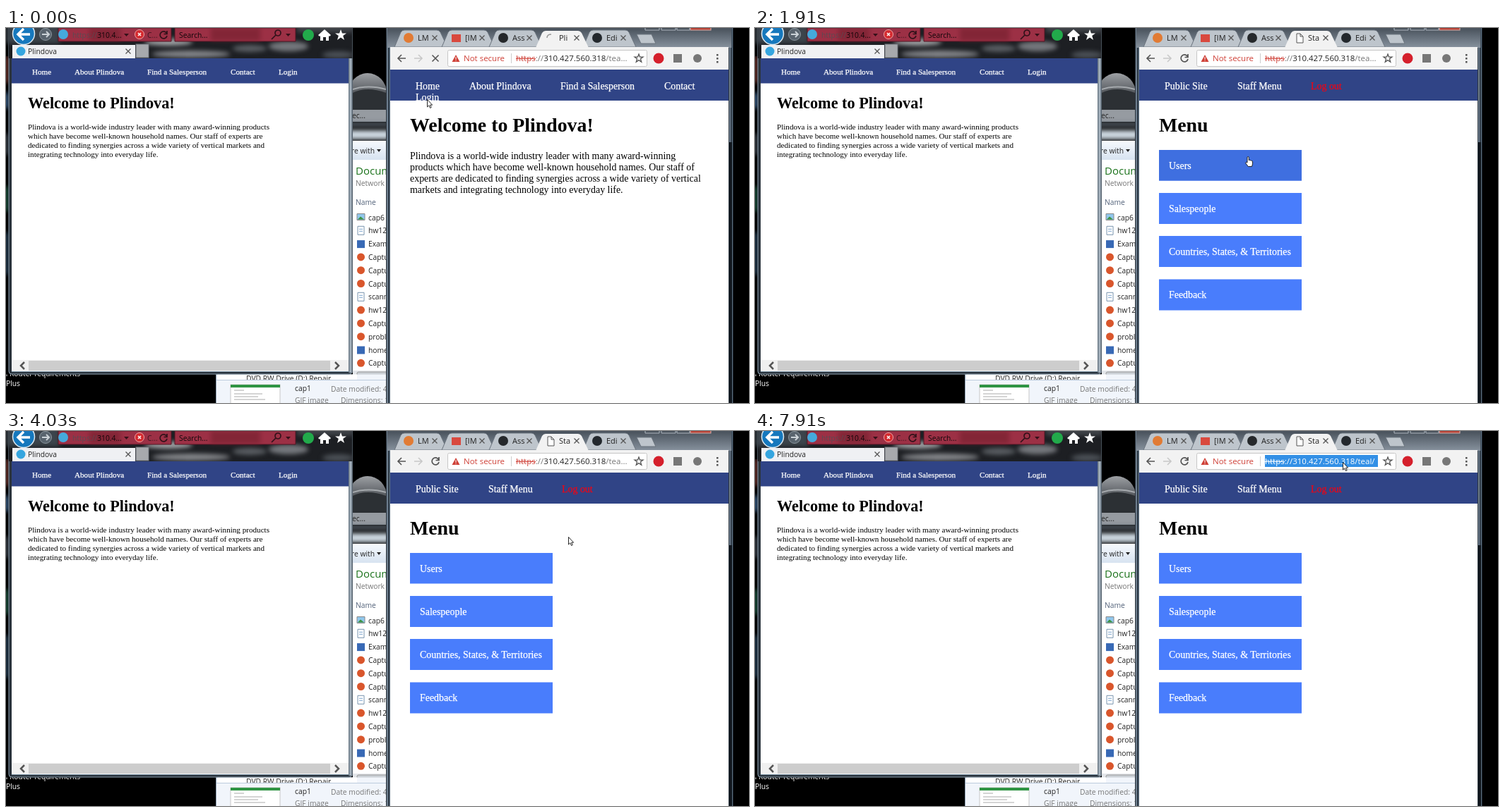
An HTML page that plays this animation: 1052 by 532 pixels, repeating every 8000 ms.

```html
<!DOCTYPE html>
<html lang="en">
<head>
<meta charset="utf-8">
<title>Two browsers</title>
<style>
html, body { margin: 0; width: 100%; height: 100%; overflow: hidden; background: #000; }
svg { display: block; }
text { white-space: pre; }
.ui { font: 10.3px "Open Sans", "Noto Sans", sans-serif; fill: #222; }
.tab { font-size: 11px; }
.url { font-size: 11.5px; }
.site { font: 13.92px "Liberation Serif", serif; }
.small { font-size: 11.14px; }
.h1 { font-size: 2em; font-weight: bold; }
.white { fill: #fff; }
.site .white { stroke: #fff; stroke-width: .25; }
.site .logout { fill: #f00414; stroke: #f00414; }
.red { fill: #cf4037; }
.grey { fill: #777; }
.line { fill: none; stroke: #555; stroke-width: 1.6; }
.soft { filter: blur(3px); }

/* Every layer shares one 8 s clock and changes in hard steps. */
.home, .loading, .users, .sales, .selected, .pointer, .arrow, .hand, .beam {
  animation: 8s step-end infinite;
}
.home { animation-name: home; }
.loading { animation-name: loading; }
.users { animation-name: users; }
.sales { animation-name: sales; }
.selected { animation-name: selected; }
.pointer { animation-name: pointer; }
.arrow { animation-name: arrow; }
.hand { animation-name: hand; }
.beam { animation-name: beam; }

@keyframes home { 0% { opacity: 1 } 1.75%, 100% { opacity: 0 } }
@keyframes loading { 0% { opacity: 1 } 3.375%, 100% { opacity: 0 } }
@keyframes users { 0%, 38.375%, 100% { opacity: 0 } 13.5% { opacity: 1 } }
@keyframes sales { 0%, 46.625%, 100% { opacity: 0 } 41.625% { opacity: 1 } }
@keyframes selected { 0% { opacity: 0 } 69%, 100% { opacity: 1 } }
@keyframes arrow {
  0%, 38.375%, 46.625%, 70.875%, 100% { opacity: 1 }
  13.5%, 41.625%, 60.125% { opacity: 0 }
}
@keyframes hand { 0%, 38.375%, 46.625%, 100% { opacity: 0 } 13.5%, 41.625% { opacity: 1 } }
@keyframes beam { 0%, 70.875%, 100% { opacity: 0 } 60.125% { opacity: 1 } }
@keyframes pointer {
  0% { transform: translate(596px, 101px) }
  9.875% { transform: translate(610px, 117px) }
  11.625% { transform: translate(638px, 148px) }
  13.5% { transform: translate(669px, 177px) }
  15.25% { transform: translate(687px, 182px) }
  18.75% { transform: translate(689px, 182px) }
  20.5% { transform: translate(691px, 182px) }
  22.125% { transform: translate(692px, 182px) }
  23.875% { transform: translate(694px, 182px) }
  27.75% { transform: translate(695px, 185px) }
  29.5% { transform: translate(697px, 189px) }
  31.25% { transform: translate(699px, 194px) }
  33% { transform: translate(702px, 200px) }
  34.75% { transform: translate(705px, 207px) }
  36.625% { transform: translate(708px, 214px) }
  38.375% { transform: translate(713px, 226px) }
  40.125% { transform: translate(717px, 238px) }
  41.625% { transform: translate(714px, 236px) }
  46.625% { transform: translate(738px, 222px) }
  48.375% { transform: translate(776px, 188px) }
  50% { transform: translate(796px, 150px) }
  51.75% { transform: translate(808px, 118px) }
  53.375% { transform: translate(814px, 95px) }
  54.875% { transform: translate(817px, 84px) }
  56.625% { transform: translate(818px, 72px) }
  58.375% { transform: translate(817px, 60px) }
  60.125% { transform: translate(814px, 41px) }
  61.875% { transform: translate(812px, 35px) }
  63.75% { transform: translate(805px, 36px) }
  65.5% { transform: translate(799px, 37px) }
  67.375% { transform: translate(803px, 38px) }
  70.875% { transform: translate(807px, 45px) }
  76.375% { transform: translate(809px, 45px) }
  78% { transform: translate(811px, 45px) }
  79.75% { transform: translate(813px, 45px) }
  81.375% { transform: translate(815px, 45px) }
  83.125% { transform: translate(817px, 44px) }
  84.75% { transform: translate(819px, 44px) }
  86.5% { transform: translate(820px, 44px) }
  97.25% { transform: translate(826px, 44px) }
  98.875%, 100% { transform: translate(832px, 44px) }
}
</style>
</head>
<body>
<svg width="1052" height="532" viewBox="0 0 1052 532">
<defs>
  <linearGradient id="strip" x2="0" y2="1"><stop stop-color="#48515b"/><stop offset="1" stop-color="#87929e"/></linearGradient>
  <linearGradient id="bar" x2="0" y2="1"><stop stop-color="#f6f9fd"/><stop offset="1" stop-color="#d6e2f0"/></linearGradient>
  <linearGradient id="lid" x2="0" y2="1"><stop stop-color="#9da0a4"/><stop offset=".5" stop-color="#54585d"/><stop offset="1" stop-color="#1d2023"/></linearGradient>
  <linearGradient id="edge"><stop stop-color="#11161c"/><stop offset=".35" stop-color="#8fa3b6"/><stop offset=".6" stop-color="#1c2530"/><stop offset="1" stop-color="#6f8496"/></linearGradient>
  <linearGradient id="rim"><stop stop-color="#5d6b78"/><stop offset=".5" stop-color="#b3c0cb"/><stop offset="1" stop-color="#46525e"/></linearGradient>
  <clipPath id="list"><path d="M491 60h47v438h-47z"/></clipPath>
  <clipPath id="below"><path d="M0 491.500h538v41H0z"/></clipPath>
  <clipPath id="tree"><path d="M298 492h200v7H298z"/></clipPath>
  <clipPath id="glass"><path d="M0 0h491v43H0z"/></clipPath>
  <clipPath id="side"><path d="M0 40h9v450H0z"/></clipPath>
  <path id="x" d="M-3.500-3.500l7 7m0-7l-7 7" fill="none" stroke="#555" stroke-width="1.300"/>
  <path id="star" d="M0-8 2-2.600 8-2.500 3.200 1 5 7 0 3.500-5 7-3.200 1-8-2.500-2-2.600z"/>
  <path id="tabshape" d="M0 27 9 6Q11 3 14 3H60Q63 3 65 6L75 27z"/>
  <path id="reload" d="M4.500-2.500A5 5 0 1 0 5 1M5-6v4.500H.500" fill="none" stroke-width="1.700"/>
</defs>

<!-- Desktop and file window -->
<rect width="1052" height="532"/>
<g clip-path="url(#list)">
  <ellipse cx="512" cy="92" rx="27" ry="28" fill="url(#lid)"/>
  <path d="M491 92q20-10 47 0v26h-47z" fill="#2c3034"/>
  <path d="M491 87q22-7 47 0" fill="none" stroke="#a6aaae" stroke-width="2"/>
  <rect x="491" y="116" width="47" height="17" fill="#969ba1"/>
  <text class="ui" x="490" y="128">ec...</text>
  <g class="soft">
    <rect x="485" y="134" width="58" height="5" fill="#69747f"/>
    <rect x="485" y="145" width="58" height="13" fill="#cdd8e1"/>
  </g>
  <rect x="491" y="160" width="47" height="28" fill="url(#bar)"/>
  <text class="ui" x="489" y="178">re with</text>
  <path d="M525 172h6l-3 4z" fill="#222"/>
  <rect x="491" y="187" width="47" height="300" fill="#fff"/>
  <text class="ui" x="495" y="208" style="font-size:15px;fill:#1b721b">Documents</text>
  <text class="ui grey" x="495" y="224">Network</text>
  <text class="ui" x="495" y="251" style="fill:#53627a">Name</text>
  <g id="files" class="ui"></g>
  <rect x="491" y="486" width="47" height="13" fill="#e3e6ea"/>
  <rect x="497" y="488" width="50" height="9" rx="2" fill="#cbd0d6" stroke="#999"/>
</g>
<g class="ui" clip-path="url(#below)">
  <text class="white" x="-6" y="494">al Router requirements</text>
  <text class="white" x="0" y="508">Plus</text>
  <rect x="297" y="490" width="241" height="42" fill="#f1f5fb"/>
  <path d="M297.500 490v42" stroke="#8fa0b2"/>
  <rect x="299" y="490" width="198" height="9" fill="#fff"/>
  <text x="340" y="501" clip-path="url(#tree)">DVD RW Drive (D:) Repair</text>
  <path d="M298 499.500h240" stroke="#bccbdd"/>
  <rect x="318" y="506" width="70" height="30" fill="#fff" stroke="#c7c7c7"/>
  <rect x="318" y="506" width="70" height="4" fill="#2f9443"/>
  <path d="M323 514h14M323 519h40M323 523h34M323 527h44" stroke="#aaa"/>
  <text x="409" y="515">cap1</text>
  <text class="grey" x="409" y="532">GIF image</text>
  <text class="grey" x="460" y="516">Date modified: 4</text>
  <text class="grey" x="474" y="532">Dimensions: 1</text>
</g>

<!-- Left browser -->
<g clip-path="url(#side)">
  <g class="soft">
    <rect x="-4" y="40" width="9" height="38" fill="#5b2b25"/>
    <rect x="-4" y="92" width="8" height="22" fill="#35587f"/>
    <rect x="-4" y="150" width="8" height="30" fill="#353c45"/>
    <rect x="-4" y="225" width="8" height="35" fill="#194d39"/>
    <rect x="-4" y="290" width="8" height="60" fill="#22394e"/>
  </g>
</g>
<rect x="4" y="-5" width="486" height="496" rx="4" fill="#2a333c" stroke="#8fa3b4"/>
<g clip-path="url(#glass)">
  <rect x="4" width="486" height="43" fill="#1d1f23"/>
  <g class="soft">
    <rect x="0" y="-4" width="76" height="26" fill="#3c444c"/>
    <ellipse cx="230" cy="20" rx="34" ry="5" fill="#a2a4a7"/>
    <ellipse cx="262" cy="37" rx="55" ry="5" fill="#85878b"/>
    <ellipse cx="400" cy="26" rx="28" ry="7" fill="#74777c"/>
    <ellipse cx="345" cy="29" rx="24" ry="5" fill="#5a5e63"/>
    <rect x="412" y="-3" width="80" height="9" fill="#43474c"/>
    <ellipse cx="470" cy="38" rx="22" ry="5" fill="#4c5157"/>
  </g>
  <path d="M74 0h160v19H74zM239 0h171v19H239z" fill="#9c3045" stroke="#521724"/>
  <path d="M118 0h44v18h-44zM290 0h70v18h-70z" fill="#75202f" opacity=".65" class="soft"/>
</g>
<circle cx="25" cy="8" r="15.500" fill="#1678bd" stroke="#dce8f0" stroke-width="1.500"/>
<path d="M34 9H17m8-8-8 8 8 8" fill="none" stroke="#fff" stroke-width="3.500"/>
<circle cx="56" cy="9" r="8.500" fill="#59646e" stroke="#8a959d"/>
<path d="M51 9h10m-4-4 4 4-4 4" fill="none" stroke="#ccd3d8" stroke-width="2"/>
<circle cx="81" cy="9" r="7" fill="#45a9dc"/>
<g class="ui">
  <text x="94" y="14" style="fill:#5b4a52">https://<tspan fill="#120609">310.4...</tspan></text>
  <path d="M167 8h7l-3.500 4zM396 8h7l-3.500 4z" fill="#351019"/>
  <circle cx="189" cy="9" r="6.500" fill="#d42a2f" stroke="#efa7a7"/>
  <path d="M187 7l4 4m0-4-4 4" stroke="#fff" stroke-width="1.500"/>
  <text x="200" y="14" style="fill:#431722">C...</text>
  <use href="#reload" x="223" y="10" stroke="#32121a"/>
  <text x="245" y="14" style="fill:#12070a">Search...</text>
  <g fill="none" stroke="#32121a" stroke-width="1.700"><circle cx="385" cy="7" r="4"/><path d="M382 10l-6 6"/></g>
  <circle cx="428" cy="10" r="8" fill="#22aa4b"/>
  <path d="M442 10l9-8 9 8-2 2-1-1v7h-4v-5h-4v5h-4v-7l-1 1z" fill="#fff"/>
  <use href="#star" x="474" y="10" fill="#fff"/>
  <path d="M9 43V24h174v19z" fill="#eff0f3"/>
  <circle cx="21" cy="33" r="6.500" fill="#35a5df"/>
  <text x="31" y="37">Plindova</text>
  <use href="#x" x="173" y="33"/>
  <rect x="184" y="23" width="18" height="19" fill="#a7a9ad" stroke="#70757c"/>
</g>
<rect x="8" y="43" width="477" height="444" fill="#fff"/>
<rect x="8" y="43" width="477" height="35.500" fill="#304486"/>
<g class="site small">
  <g class="white">
    <text x="37" y="66">Home</text>
    <text x="97" y="66">About Plindova</text>
    <text x="200" y="66">Find a Salesperson</text>
    <text x="318" y="66">Contact</text>
    <text x="386" y="66">Login</text>
  </g>
  <text class="h1" x="31" y="113.500">Welcome to Plindova!</text>
  <text x="31" y="144">Plindova is a world-wide industry leader with many award-winning products</text>
  <text x="31" y="157">which have become well-known household names. Our staff of experts are</text>
  <text x="31" y="170">dedicated to finding synergies across a wide variety of vertical markets and</text>
  <text x="31" y="183">integrating technology into everyday life.</text>
</g>
<rect x="8" y="471" width="477" height="16" fill="#f0f0f0"/>
<rect x="32" y="472" width="427" height="14" fill="#cdcdcd"/>
<path d="M26 474l-5 5 5 5M466 474l5 5-5 5" fill="none" stroke="#555" stroke-width="2.500"/>
<rect x="485" y="43" width="6" height="446" fill="url(#rim)"/>
<path d="M8 487.500h477" stroke="#7b93a5"/>

<!-- Right browser -->
<rect x="538" width="492" height="532" fill="#1b222b"/>
<rect x="538" width="6" height="532" fill="url(#edge)"/>
<rect x="1023" width="6" height="532" fill="url(#edge)"/>
<rect x="1024" y="162" width="4" height="370" fill="#10161d"/>
<rect x="540" width="487" height="28" fill="url(#strip)"/>
<path d="M905-3h20v6h-20zM928-3h20v6h-20zM950-3h18v6h-18z" fill="#49525c" stroke="#b1bac3"/>
<rect x="969" y="-3" width="29" height="6" fill="#b44236" stroke="#ddb2ac"/>
<g fill="#bec5cc" stroke="#6b747e">
  <use href="#tabshape" x="817"/>
  <use href="#tabshape" x="550"/>
  <use href="#tabshape" x="617"/>
  <use href="#tabshape" x="684"/>
  <path d="M893 9h21l6 13h-21z"/>
</g>
<rect x="544" y="27" width="479" height="32" fill="#f2f2f2"/>
<use href="#tabshape" x="750" y="1" fill="#f2f2f2"/>
<circle cx="570" cy="14" r="7" fill="#e17b34"/>
<rect x="631" y="9" width="13" height="11" fill="#d9493e"/>
<circle cx="704" cy="14" r="7" fill="#25282b"/>
<circle cx="837" cy="14" r="7" fill="#23282d"/>
<path d="M767 8h5l4 4v9h-9zM772 8v4h4" fill="#fff" stroke="#555"/>
<g class="ui tab">
  <text x="583" y="18">LM</text>
  <text x="650" y="18">[IM</text>
  <text x="717" y="18">Ass</text>
  <text x="783" y="18">Sta</text>
  <text x="850" y="18">Edi</text>
</g>
<use href="#x" x="607" y="14"/>
<use href="#x" x="674" y="14"/>
<use href="#x" x="741" y="14"/>
<use href="#x" x="808" y="14"/>
<use href="#x" x="874" y="14"/>
<path class="line" d="M566 43H555m5-5-5 5 5 5"/>
<path class="line" d="M578 43h11m-5-5 5 5-5 5" style="stroke:#c8c8c8"/>
<use href="#reload" x="608" y="43" stroke="#555"/>
<rect x="625.500" y="31.500" width="282" height="23" rx="2" fill="#fff" stroke="#c6c6c6"/>
<path d="M637 38l5.500 10h-11z" class="red"/>
<path d="M637 41v4m0 1v1" stroke="#fff"/>
<g class="ui url">
  <text class="red" x="648" y="47">Not secure</text>
  <path d="M715.500 36v14" stroke="#ccc"/>
  <text class="grey" x="722" y="47"><tspan class="red">https</tspan>://<tspan fill="#222">310.427.560.318</tspan>/tea...</text>
  <path d="M722 43.500h28" stroke="#cf4037"/>
  <g class="selected">
    <rect x="722" y="33" width="160" height="18" fill="#fff"/>
    <rect x="722" y="34" width="160" height="17" fill="#3390e6"/>
    <text class="white" x="722" y="47">https://310.427.560.318/teal/</text>
    <path d="M722 43.500h28" stroke="#fff"/>
  </g>
</g>
<use href="#star" transform="translate(896 43) scale(.75)" fill="none" stroke="#555" stroke-width="1.700"/>
<circle cx="924" cy="43" r="7.500" fill="#d5202c"/>
<rect x="945" y="37" width="12" height="12" fill="#777"/>
<circle cx="979" cy="43" r="6" fill="#777"/>
<path d="M1006 37h2.500v2.500h-2.500zM1006 42h2.500v2.500h-2.500zM1006 47h2.500v2.500h-2.500z" fill="#555"/>

<rect x="544" y="59" width="479" height="473" fill="#fff"/>
<rect x="544" y="59" width="479" height="44" fill="#304486"/>
<g class="site">
  <g class="white">
    <text x="580" y="87">Public Site</text>
    <text x="683" y="87">Staff Menu</text>
    <text class="logout" x="787" y="87">Log out</text>
  </g>
  <text class="h1" x="572" y="146.500">Menu</text>
  <path d="M572 173h202v43.500H572zM572 234h202v44H572zM572 295h202v44H572zM572 356.500h202v44H572z" fill="#497dfc"/>
  <rect class="users" x="572" y="173" width="202" height="43.500" fill="#3f6fe0"/>
  <rect class="sales" x="572" y="234" width="202" height="44" fill="#3f6fe0"/>
  <g class="white">
    <text x="586" y="199.500">Users</text>
    <text x="586" y="260.500">Salespeople</text>
    <text x="586" y="322">Countries, States, &amp; Territories</text>
    <text x="586" y="383">Feedback</text>
  </g>
</g>

<!-- Page shown before the menu arrives -->
<g class="home">
  <rect x="544" y="59" width="479" height="473" fill="#fff"/>
  <rect x="544" y="59" width="479" height="44" fill="#304486"/>
  <rect x="782" y="6" width="18" height="16" fill="#f2f2f2"/>
  <text class="ui tab" x="783" y="18">Pli</text>
  <g class="site">
    <g class="white">
      <text x="580" y="87">Home</text>
      <text x="656" y="87">About Plindova</text>
      <text x="785" y="87">Find a Salesperson</text>
      <text x="932" y="87">Contact</text>
      <text x="580" y="102.500">Login</text>
    </g>
    <text class="h1" x="572" y="146.500">Welcome to Plindova!</text>
    <text x="572" y="185.500">Plindova is a world-wide industry leader with many award-winning</text>
    <text x="572" y="201.500">products which have become well-known household names. Our staff of</text>
    <text x="572" y="217.500">experts are dedicated to finding synergies across a wide variety of vertical</text>
    <text x="572" y="233.500">markets and integrating technology into everyday life.</text>
  </g>
</g>
<g class="loading">
  <path d="M764 6h15v17h-15zM599 33h18v20h-18z" fill="#f2f2f2"/>
  <path d="M766 14q0-5 6-5" fill="none" stroke="#999" stroke-width="1.500"/>
  <path class="line" d="M603.500 38.500l9 9m0-9-9 9"/>
</g>

<g class="pointer">
  <path class="arrow" d="M.500.500v10.500l2.300-2.200 1.700 3.700 1.700-.8-1.600-3.500h3z" fill="#fff" stroke="#111" stroke-width=".9"/>
  <path class="hand" d="M3 9V1.800q0-1.300 1.100-1.300t1.100 1.300V5.500q1.300-.7 2 .4 1.300-.5 1.800.6 1.500-.3 1.500 1.300v3l-1 3.700H4.300L.700 9.800q-.3-1.500 1-1.300z" fill="#fff" stroke="#111" stroke-width=".9"/>
  <path class="beam" d="M1 .500h2l.5 1 .5-1h2M3.500 1v12M1 13.500h2l.5-1 .5 1h2" fill="none" stroke="#222"/>
</g>
</svg>
<script>
const files = ["cap6:pic", "hw12:doc", "Example:word", "Capture:gif", "Capture:gif", "Capture:gif",
  "scanner:doc", "hw12:gif", "Capture:gif", "problem:gif", "homework:word", "Capture:gif"];
const icons = {
  pic: '<path d="M497 -5h11v9h-11z" fill="#91c7ec" stroke="#888"/><path d="M498 3l4-4 5 4z" fill="#3b913e"/>',
  doc: '<path d="M498 -6h9v12h-9z" fill="#fff" stroke="#7994ae"/><path d="M500 -2h5m-5 3h5" stroke="#7ca6cf"/>',
  word: '<rect x="497" y="-5" width="11" height="11" fill="#3869b5"/>',
  gif: '<circle cx="502.500" r="5.500" fill="#d9562c"/>'
};
document.getElementById("files").innerHTML = files.map((file, i) => {
  const [name, kind] = file.split(":");
  return `<g transform="translate(0 ${268.500 + i * 18.8})">${icons[kind]}<text x="513" y="4">${name}</text></g>`;
}).join("");
</script>
</body>
</html>
```
